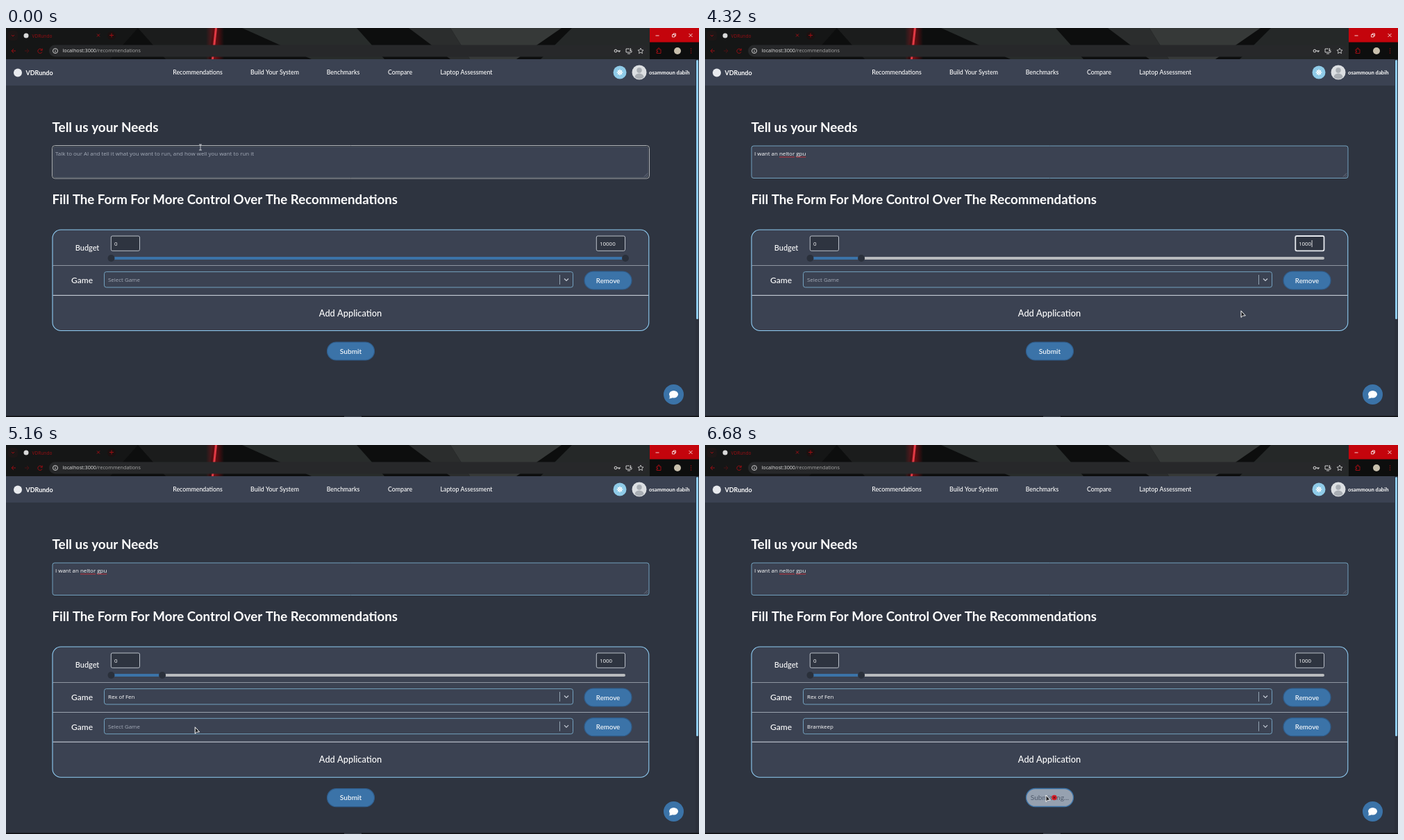
Recreate the animation shown at these times as an HTML page with a canvas. Size 998x561 px, loop 6720 ms.

```html
<!DOCTYPE html>
<html lang="en">
<head>
<meta charset="utf-8">
<title>Recommendations</title>
<style>
  html, body { margin: 0; width: 100%; height: 100%; overflow: hidden; background: #2e3440; }
  canvas { display: block; width: 998px; height: 561px; }
</style>
</head>
<body>
<canvas id="stage"></canvas>
<script>
const W = 998, H = 561, LOOP = 6720;
const canvas = document.getElementById('stage');
const ctx = canvas.getContext('2d');
const scale = window.devicePixelRatio || 1;
canvas.width = W * scale;
canvas.height = H * scale;

const PAGE = '#2e3440', CARD = '#3b4252', BLUE = '#3b73a8', SKY = '#90cdf4', EDGE = '#7aaccb';
const WHITE = '#fff', PALE = '#c6ccd6', MUTED = '#a5acb9', RED = '#9a0d12';
const title = (size, weight = 500) => `${weight} ${size}px Lato, sans-serif`;
const BODY = '7.95px "Open Sans", sans-serif';
const URL_FONT = '7.2px "Open Sans", sans-serif';
const BRAND = 'VDRundo';
const PROMPT = 'I want an neltor gpu';
const GAMES = ['Mornwick Legend', 'Rex of Fen', 'Neonvarge 2093', 'Bramkeep', 'Zelkoran',
  'Dun Mesa Reparation 2', 'Toot-Toot Desmond', 'Grove of Talfen'];
const ITEM = 20.75;

// Moments at which the interface changes, in ms
const AT = { typing: 500, key: 110, budget: 3080, select: 3180, digits: 3460, add: 4380,
  open1: 4720, pick1: 4990, open2: 5210, pick2: 5660, submit: 6240 };

// Pointer path: time, x, y
const PATH = [
  [0, 280, 172], [2660, 280, 172], [3060, 880, 312], [3140, 880, 312], [3320, 796, 316],
  [3880, 796, 316], [4280, 772, 408], [4440, 772, 407], [4560, 772, 393], [4700, 320, 364],
  [4750, 320, 366], [4840, 307, 437], [4970, 290, 413], [5050, 290, 413], [5190, 270, 406],
  [5240, 270, 407], [5400, 253, 461], [5630, 250, 497], [5720, 250, 497], [6120, 491, 505],
  [LOOP, 491, 505]
];

function pointer(t) {
  const i = Math.max(1, PATH.findIndex(p => p[0] > t));
  const [t0, x0, y0] = PATH[i - 1], [t1, x1, y1] = PATH[i];
  const u = (t - t0) / (t1 - t0), e = u * u * (3 - 2 * u);
  return { x: x0 + (x1 - x0) * e, y: y0 + (y1 - y0) * e };
}

function text(s, x, y, font, color = WHITE, align = 'left') {
  ctx.font = font;
  ctx.fillStyle = color;
  ctx.textAlign = align;
  ctx.fillText(s, x, y);
}

function paint(fill, stroke, width = 1) {
  if (fill) { ctx.fillStyle = fill; ctx.fill(); }
  if (stroke) { ctx.strokeStyle = stroke; ctx.lineWidth = width; ctx.stroke(); }
}

function box(x, y, w, h, r, fill, stroke, width) {
  ctx.beginPath();
  ctx.roundRect(x, y, w, h, r);
  paint(fill, stroke, width);
}

function circle(x, y, r, fill, stroke, width) {
  ctx.beginPath();
  ctx.arc(x, y, r, 0, 7);
  paint(fill, stroke, width);
}

function path(d, dx, dy, fill, stroke, width) {
  ctx.save();
  ctx.translate(dx, dy);
  const p = new Path2D(d);
  if (fill) { ctx.fillStyle = fill; ctx.fill(p); }
  if (stroke) { ctx.strokeStyle = stroke; ctx.lineWidth = width || 1; ctx.stroke(p); }
  ctx.restore();
}

function rect(x, y, w, h, fill) {
  ctx.fillStyle = fill;
  ctx.fillRect(x, y, w, h);
}

function browserBar() {
  rect(0, 0, W, 45, '#0d0e0e');
  path('M0 0H190L150 45H0Z', 0, 0, '#151616');
  path('M190 0H298L292 45H230Z', 0, 0, '#1b1c1c');
  path('M340 0H505L545 45H440Z', 0, 0, '#282c2b');
  path('M580 0H640L668 45H640Z', 0, 0, '#2b2d2d');
  path('M640 0H800L735 45H668Z', 0, 0, '#363938');
  path('M815 0H927V45H770Z', 0, 0, '#252828');
  const glow = ctx.createLinearGradient(288, 0, 314, 0);
  glow.addColorStop(0, '#c0101800');
  glow.addColorStop(.5, '#c0101888');
  glow.addColorStop(1, '#c0101800');
  rect(288, 0, 26, 45, glow);
  path('M301 0H304L299 45H296Z', 0, 0, '#e23a44');

  // Tab strip
  box(3, 4, 14, 14, 4, '#1d1616');
  path('M-2-1L0 1L2-1', 10, 11, null, RED);
  circle(29, 11, 3.5, '#d9d9d9');
  text(BRAND, 37.5, 13.5, '6.6px "Open Sans", sans-serif', RED);
  path('M-2-2L2 2M2-2L-2 2', 133, 10.5, null, RED);
  circle(152, 11, 6, '#1d1010');
  path('M-3 0H3M0-3V3', 152, 10.5, null, RED);
  rect(927, 0, 71, 20.5, '#c4040c');
  path('M-2.5 0H2.5', 938, 11, null, WHITE, .8);
  path('M-2.5-1H1V2.5H-2.5ZM-1-1V-2.5H2.5V1H1', 962, 10.5, null, WHITE, .8);
  path('M-2.5-2.5L2.5 2.5M2.5-2.5L-2.5 2.5', 986, 10.5, null, WHITE, .8);

  // Address row
  path('M3 0H-3M0-3L-3 0L0 3', 11, 33, null, RED);
  path('M-3 0H3M0-3L3 0L0 3', 30, 33, null, '#4a1012');
  path('M3-1A3.2 3.2 0 1 0 3 1.5M3.2-3.5V-.8H.5', 49, 33, null, RED);
  box(62, 24.5, 863, 17, 8.5, '#27282a');
  circle(71, 33, 3.5, null, '#ddd', .9);
  path('M0-.5V2M0-2V-1.2', 71, 33, null, '#ddd', .9);
  text('localhost:3000', 81.5, 35.4, URL_FONT, '#e4e4e4');
  const hostWidth = ctx.measureText('localhost:3000').width;
  text('/recommendations', 81.5 + hostWidth, 35.4, URL_FONT, '#aaa');
  circle(878, 33, 1.9, null, '#ddd');
  path('M2 0H7M5 0V2', 878, 33, null, '#ddd', 1.2);
  path('M1-3H-4V2H4V0M-2 4H2M2.5-4V0M.8-1.5L2.5 .2L4.2-1.5', 897, 33, null, '#ddd', .9);
  path('M0-4L1.2-1.3L4-1L1.9 .9L2.5 3.7L0 2.2L-2.5 3.7L-1.9 .9L-4-1L-1.2-1.3Z', 914, 33, null, '#ddd', .8);
  path('M-3-2H-1V-4H1V-2H3V3.5H-3V1.5H-1.5V0H-3Z', 940, 33, null, RED);
  circle(967, 33, 5, '#c9c0ad');
  for (let y = 30; y < 37; y += 3) circle(986.5, y, .8, RED);
}

function navBar() {
  rect(0, 45, 993, 38, CARD);
  circle(17, 64.5, 6, '#e8eaee');
  text(BRAND, 28.5, 67.5, title(9, 700));
  [['Recommendations', 276], ['Build Your System', 387], ['Benchmarks', 485.5], ['Compare', 567.5],
    ['Laptop Assessment', 663]].forEach(([s, x]) => text(s, x, 67, title(8.8), WHITE, 'center'));
  circle(884, 64, 9.5, '#8fcbe8');
  for (let i = 0; i < 4; i++) {
    const c = 4.5 * Math.cos(i * Math.PI / 4), s = 4.5 * Math.sin(i * Math.PI / 4);
    path(`M${-c} ${-s}L${c} ${s}`, 884, 64, null, WHITE, 1);
  }
  circle(884, 64, 2.8, null, WHITE, .9);
  circle(912, 64, 10.5, '#dcdfe2');
  circle(912, 61, 3.7, '#a9aeb4');
  path('M-6.5 6A6.5 5.5 0 0 1 6.5 6Q0 11-6.5 6Z', 912, 65, '#a9aeb4');
  text('osammoun dabih', 984.5, 66.8, title(7.7, 700), WHITE, 'right');

  rect(993, 45, 5, 516, '#2b303b');
  box(994, 46, 3, 374, 1.5, SKY);
}

function button(label, x, y, w) {
  box(x + .5, y + .5, w, 26, 13, BLUE, '#2f5d8c', 1.2);
  text(label, x + w / 2 + .5, y + 17.2, title(label === 'Submit' ? 10.2 : 9.7), WHITE, 'center');
}

function promptBox(t) {
  const focused = t < AT.budget;
  if (focused) {
    box(66.5, 169.5, 860, 47.5, 4, '#15181d', '#d4d7dc', .8);
    box(68, 171, 857, 44.5, 3, CARD, '#596273', .8);
  } else {
    box(67, 170, 859, 46.5, 3, CARD, EDGE, .9);
  }
  path('M-5 0L0-5M-2 0L0-2', 924, 214.5, null, '#8b93a2', .6);

  const count = Math.max(0, Math.min(PROMPT.length, Math.floor((t - AT.typing) / AT.key)));
  if (!count) {
    text('Talk to our AI and tell it what you want to run, and how well you want to run it', 71, 184, BODY, MUTED);
    return;
  }
  const typed = PROMPT.slice(0, count);
  text(typed, 71, 184, BODY);
  const end = 71 + ctx.measureText(typed).width;
  if (focused) rect(end, 176.5, .8, 9.5, WHITE);
  for (const word of ['neltor', 'gpu']) {
    const start = PROMPT.indexOf(word);
    if (focused && count <= start + word.length) continue;
    const x = 71 + ctx.measureText(PROMPT.slice(0, start)).width;
    rect(x, 185.6, ctx.measureText(word).width, .9, '#d0303a');
  }
}

function numberField(x, value, focused, selected) {
  box(x + .3, 300, 41.2, 21.3, 2, PAGE, focused ? '#e6e9ee' : '#c9ced6', focused ? 1.8 : .9);
  ctx.font = BODY;
  const width = ctx.measureText(value).width;
  if (selected) rect(x + 4.5, 304.5, width + 1, 13, '#3f74a8');
  text(value, x + 5, 314, BODY);
  if (focused && !selected) rect(x + 5.5 + width, 306, .8, 10, WHITE);
}

function budgetRow(t) {
  text('Budget', 134.3, 321, title(10.9), WHITE, 'right');
  const digits = Math.min(4, Math.floor((t - AT.digits) / 100) + 1);
  const value = digits > 0 ? '1000'.slice(0, digits) : '10000';
  const focused = t >= AT.budget && t < AT.add;
  numberField(151, '0');
  numberField(850, value, focused, t >= AT.select && digits < 1);
  const knob = 151 + 741 * value / 10000;
  box(151, 330, 741, 4, 2, '#b9bbbe');
  box(151, 330, knob - 151, 4, 2, BLUE);
  circle(151.5, 332, 5, '#2a303b');
  circle(knob, 332, 5, '#2a303b');
  rect(67.5, 342.4, 858, 1.1, PALE);
}

function gameRow(y, game, open) {
  rect(68, y, 857, 42, CARD);
  text('Game', 125, y + 25.2, title(12), WHITE, 'right');
  box(141.5, y + 8.6, 675, 22.4, 3, CARD, open ? '#5b9bd0' : EDGE, open ? 1.6 : .9);
  text(game || 'Select Game', 147, y + 23, BODY, game ? WHITE : MUTED);
  if (open) rect(147, y + 15, .9, 10, WHITE);
  rect(797, y + 13, .8, 14, '#a9bccb');
  path('M-3-1.5L0 1.5L3-1.5', 807, y + 20, null, open ? '#737d8e' : PALE, 1.2);
  button('Remove', 832.5, y + 7.5, 68);
  rect(67.5, y + 42, 858, 1.1, PALE);
}

function menu(top, cursor) {
  ctx.save();
  box(141.5, top + .5, 675, 156, 3, CARD, EDGE);
  ctx.clip();
  const hover = Math.max(0, Math.floor((cursor.y - top - 2.5) / ITEM));
  GAMES.forEach((game, i) => {
    const y = top + 2.5 + i * ITEM;
    if (i === hover) rect(142, y, 671, ITEM, '#495268');
    text(game, 146, y + 13.3, BODY);
  });
  box(812.5, top + 1.5, 3, 112, 1.5, SKY);
  ctx.restore();
}

function drawPointer(t, { x, y }) {
  const inPrompt = x > 67 && x < 926 && y > 170 && y < 217;
  const inField = x > 850 && x < 892 && y > 300 && y < 322;
  if (inPrompt || inField) {
    path('M-2-4H2M0-4V4M-2 4H2', x, y, null, '#e4e6ea', .8);
    return;
  }
  path('M0 0V9.5L2.4 7.3L6.3 7Z', x, y, '#16181c', WHITE, 1);
  if (t >= AT.submit) {
    circle(x + 12, y + 3.5, 3.8, '#d3202a');
    path('M-1.5-1.5L1.5 1.5M1.5-1.5L-1.5 1.5', x + 12, y + 3.5, null, '#4a1014', 1);
  }
}

function form(t, cursor) {
  const added = t >= AT.add, shift = added ? 42.7 : 0;
  const panel = (fill, stroke) => box(67, 291, 858.8, 145.5 + shift, 12, fill, stroke, 1.1);
  panel(CARD);
  budgetRow(t);
  gameRow(343, t >= AT.pick1 && GAMES[1], t >= AT.open1 && t < AT.pick1);
  if (added) {
    const p = Math.min(1, (t - AT.add) / 300);
    if (p < 1) rect(68, 386.2, 857, 43, PAGE);
    ctx.globalAlpha = p;
    gameRow(385.7 - 8 * (1 - p), t >= AT.pick2 && GAMES[3], t >= AT.open2 && t < AT.pick2);
    ctx.globalAlpha = 1;
  }
  panel(null, SKY);
  text('Add Application', 496, 415.5 + shift, title(12.8), WHITE, 'center');
  if (t < AT.submit) {
    button('Submit', 462, 452.5 + shift, 68);
  } else {
    box(462.5, 495.5, 68, 26, 13, '#96a1b0', BLUE, 1.3);
    text('Submitting...', 496.5, 512.4, title(10.2), '#566172', 'center');
  }
  if (t >= AT.open1 && t < AT.pick1) menu(378.5, cursor);
  if (t >= AT.open2 && t < AT.pick2) menu(421.2, cursor);
}

function draw(t) {
  const cursor = pointer(t);
  ctx.setTransform(scale, 0, 0, scale, 0, 0);
  rect(0, 0, W, H, PAGE);
  browserBar();
  navBar();
  text('Tell us your Needs', 66.5, 150.3, title(18.9, 700));
  promptBox(t);
  text('Fill The Form For More Control Over The Recommendations', 66.5, 254.3, title(18.7, 700));
  form(t, cursor);
  circle(961.5, 528.5, 14.5, BLUE);
  path('M-6 2Q-5 5-7 6Q-3 6-1 4Z', 961.5, 528.5, WHITE);
  ctx.beginPath();
  ctx.ellipse(961.5, 528.3, 6.5, 5.3, 0, 0, 7);
  paint(WHITE);
  rect(0, 559.5, W, 1.5, '#0c0d10');
  rect(487, 559.5, 25, 1.5, '#3a3f49');
  drawPointer(t, cursor);
}

function tick() {
  draw(performance.now() % LOOP);
  requestAnimationFrame(tick);
}
tick();
</script>
</body>
</html>
```
